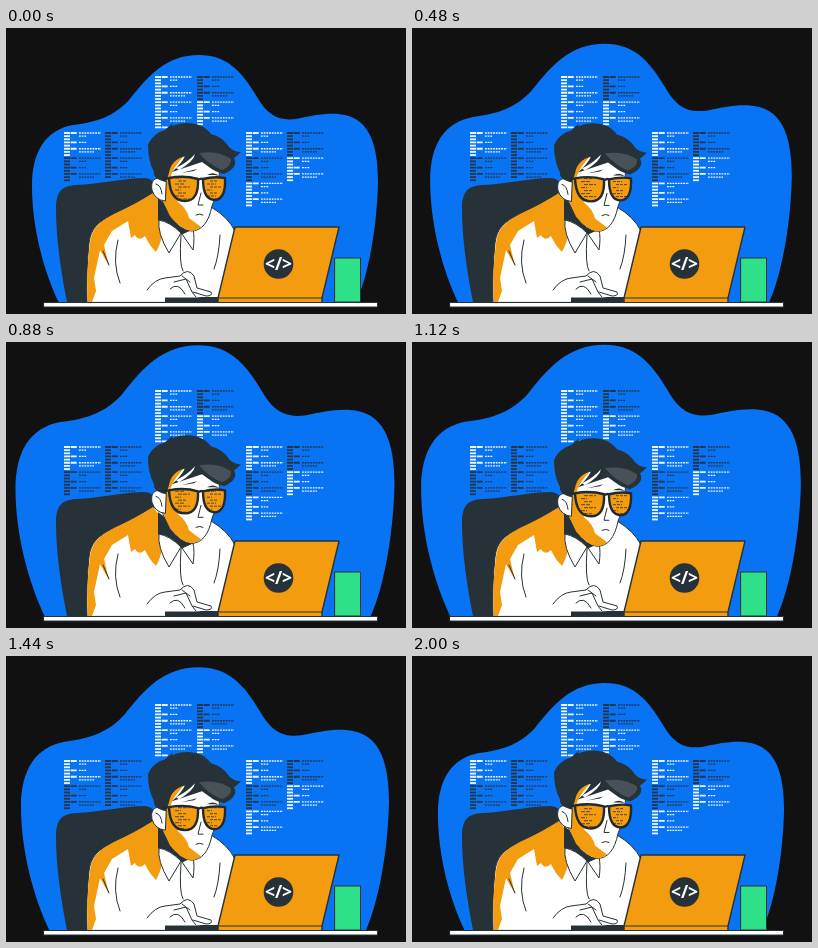
These frames come from a looping animation (400 by 286 pixels, 2.04 s). An HTML page:

```html
<!DOCTYPE html>
<html lang="en">
<head>
<meta charset="utf-8">
<title>Coder at a laptop</title>
<style>
html, body { margin: 0; width: 100%; height: 100%; overflow: hidden; background: #111; }
svg { display: block; width: 100vw; height: 100vh; }
.dark { fill: #263238; }
.orange { fill: #f39c0f; }
.white { fill: #fff; }
.ink { stroke: #263238; stroke-width: 1; stroke-linejoin: round; stroke-linecap: round; }
.bold { stroke-width: 1.4; }
.line { fill: none; }
</style>
</head>
<body>
<svg viewBox="0 0 400 286">
  <defs>
    <clipPath id="lenses">
      <path d="M163 150Q178 147 192 151Q193 173 179 173Q164 173 163 150ZM197 151Q208 148 219 150Q220 171 209 172Q197 172 197 151Z"/>
    </clipPath>
  </defs>

  <path id="blob" fill="#0873f3" d="M53 275C38 244 26 200 26 158C26 123 40 102 67 97C92 94 108 88 123 72C142 48 160 27 193 27C220 27 235 42 251 69C262 88 273 93 290 91C305 88 318 85 332 86C361 88 372 112 372 154C371 198 363 246 350 275Z"/>
  <g id="code"></g>

  <!-- chair -->
  <path class="dark" d="M61 274C55 244 50 210 50 181C50 162 57 158 70 157C96 156 116 150 140 150Q149 151 150 162L145 200L90 274Z"/>

  <!-- shirt -->
  <path class="white ink" d="M81 274Q80 243 83 215C85 200 92 194 108 186Q130 176 147 165L160 172L205 179Q222 189 229 203L213 274Z"/>
  <path class="orange" d="M82 274Q80 243 84 215C86 200 93 194 108 186Q130 176 147 165L154 174L152 190L157 205Q154 217 150 224Q143 217 139 208Q133 214 129 207L125 210L122 193L106 203L98 217L103 238L94 222L88 250L90 263L86 274Z"/>
  <path class="dark" d="M152 170L175 188L187 203L176 207Q165 193 152 192Z"/>
  <path class="white ink" d="M153 192Q151 205 163 225L175 205Q164 194 153 192ZM187 201L176 206L187 222Q189 210 187 201Z"/>
  <path class="ink line" d="M175 207Q173 237 177 243M112 212Q106 235 114 255M214 207Q213 228 208 241M97 223L103 237"/>

  <g id="head">
    <path class="white ink" d="M160 130L213 124Q216 157 206 178Q201 203 185 203Q174 202 164 188L157 174Z"/>
    <path class="orange" d="M158 130L178 128Q164 143 164 153L172 174Q181 181 183 190L195 199Q190 203 185 203Q174 201 164 188L157 173Z"/>
    <path class="white ink" d="M160 153C151 147 144 151 146 162Q149 172 159 173Z"/>
    <path class="ink line" d="M150 156Q155 157 156 166M190 187Q194 185 197 187M195 165L192 177L197 177"/>
    <path class="dark" d="M160 154Q147 151 148 144Q142 133 142 117C145 109 152 104 159 102L167 95L166 98C181 92 197 95 205 106Q217 109 223 119Q228 124 235 124Q230 129 228 130Q233 139 218 146Q209 144 203 139L196 134L166 144Q176 135 179 128Q165 132 163 145Z"/>
    <path class="white" d="M170 140Q182 134 189 126Q188 133 173 142Z"/>
    <path fill="#485158" d="M193 125Q212 122 225 131Q226 138 216 142Q203 137 193 125Z"/>
    <path class="dark" d="M175 145L191 141L188 143ZM201 147Q208 143 213 148L209 147Z"/>
    <g clip-path="url(#lenses)">
      <path class="orange" d="M160 145H224V178H160Z"/>
      <g id="glint"></g>
    </g>
    <path class="line" stroke="#202a30" stroke-width="2.4" stroke-linejoin="round" d="M157 151L163 150Q178 147 192 151Q193 173 179 173Q164 173 163 150M192 152Q195 150 197 151Q208 148 219 150Q220 171 209 172Q197 172 197 151"/>
  </g>

  <!-- hand -->
  <path class="dark" d="M159 269H212V275H159Z"/>
  <path class="white" d="M141 262L159 250L174 248L182 242L190 264L206 268L190 269.5H141Z"/>
  <path class="ink line" d="M141 262Q149 251 159 250L174 248Q182 239 188 248L191 260L205 264Q207 268 200 268L187 264M168 254L180 251L186 264L190 269M176 248L184 254M164 261Q172 253 179 266"/>

  <!-- desk -->
  <path fill="#2ee087" class="ink" d="M329 230H354.5V274H329Z"/>
  <path class="orange ink bold" d="M229 199H333L316 270V275H212V270Z"/>
  <path class="ink line" d="M212 270H316"/>
  <circle class="dark" cx="272.5" cy="236" r="14.8"/>
  <text x="272.5" y="242" text-anchor="middle" fill="#fff" font-family="'Open Sans', sans-serif" font-weight="700" font-size="17.5">&lt;/&gt;</text>
  <path class="white ink" d="M38 274.5H371.5V279H38Z"/>
</svg>
<script>
const get = id => document.getElementById(id);

function rule(parent, x, y, width, color, weight, dash) {
  const path = document.createElementNS("http://www.w3.org/2000/svg", "path");
  path.setAttribute("d", `M${x} ${y}h${width}`);
  path.setAttribute("stroke", color);
  path.setAttribute("stroke-width", weight);
  path.setAttribute("stroke-dasharray", dash);
  parent.append(path);
}

// Each column: x, y, number of rows, and one colour per eight rows (w = white, d = dark).
const columns = [
  [58, 105, 16, "wd"], [99, 105, 15, "dd"],
  [149, 49, 17, "www"], [191, 49, 16, "dw"],
  [240, 105, 24, "wdw"], [281, 105, 16, "dw"]
];
const bars = [13, 6, 6, 13, 6, 13, 6, 6];
const tails = [22, 8, 0, 8, 0, 22, 15, 0];
for (const [x, y, rows, tones] of columns) {
  for (let i = 0; i < rows; i++) {
    const row = i % 8, top = y + i * 3.15;
    const color = tones[i >> 3] === "w" ? "#eef6ff" : "#24344b";
    rule(get("code"), x, top, bars[row], color, 1.8, "6 .7");
    rule(get("code"), x + 15, top, tails[row], color, 1.3, "1.8 .9");
  }
}

// Reflected code repeats every 12 px, so the scroll closes its loop.
for (let i = 0; i < 16; i++) {
  const y = 150 + i * 3, shift = i % 2 * 3, width = 5 + i % 4 * 2;
  rule(get("glint"), 169 + shift, y, width + 1, "#5d4520", 1, "4 1");
  rule(get("glint"), 201 + shift, y, width, "#5d4520", 1, "3 1");
}

const LOOP = 2040;
function draw(now) {
  const time = Math.floor(now % LOOP / 40) * 40;
  const angle = time / LOOP * 2 * Math.PI;
  const scale = 1 + 0.1 * (1 - Math.cos(angle)) / 2;
  get("blob").setAttribute("transform", `translate(199 275) scale(${scale}) translate(-199 -275)`);
  get("head").setAttribute("transform", `translate(0 ${2.2 * Math.sin(2 * angle)})`);
  get("glint").setAttribute("transform", `translate(0 ${-12 * time / LOOP})`);
  requestAnimationFrame(draw);
}
draw(performance.now());
</script>
</body>
</html>
```
